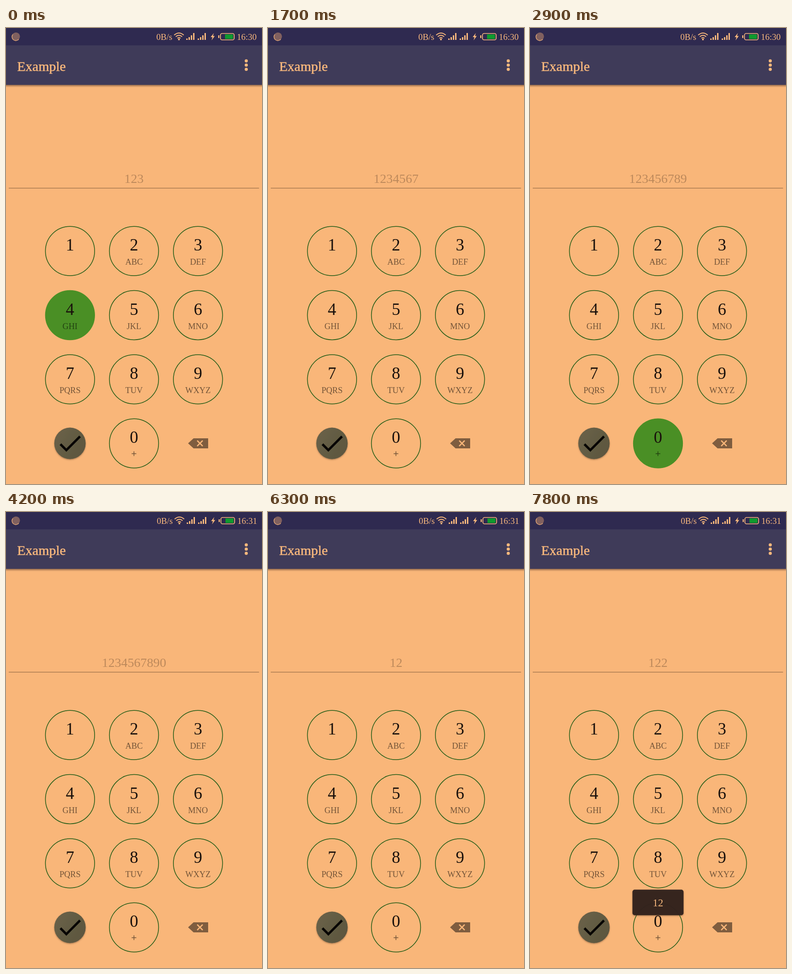
An HTML page for the animation above (8000 ms loop, 561 by 998 pixels).

```html
<!DOCTYPE html>
<html lang="en">
<head>
<meta charset="utf-8">
<title>Keypad</title>
<style>
  html, body { margin: 0; width: 100%; height: 100%; overflow: hidden; background: #f9b679; }
  svg { display: block; width: 561px; height: 998px; font-family: "Liberation Serif", "Times New Roman", serif; }
  .mid { text-anchor: middle; }
  .digit { font-size: 37px; fill: #1a110c; }
  .label { font-size: 18.5px; fill: #000; fill-opacity: .54; }
  .plus { font-size: 21px; stroke: #000; stroke-opacity: .3; stroke-width: .5px; }
  .ring { fill: none; stroke: #1d5a14; stroke-width: 1.5px; }
  .ring.down { fill: #4a8f25; stroke: #4a8f25; }
  .status { font-size: 19px; }
</style>
</head>
<body>
<svg viewBox="0 0 561 998">
  <defs>
    <linearGradient id="shade" x2="0" y2="1">
      <stop offset="0" stop-color="#5a3a28" stop-opacity=".6"/>
      <stop offset="1" stop-color="#5a3a28" stop-opacity="0"/>
    </linearGradient>
    <linearGradient id="olive" x2="1" y2=".6">
      <stop offset="0" stop-color="#6b6249"/>
      <stop offset="1" stop-color="#5d573f"/>
    </linearGradient>
    <filter id="soft" x="-20%" y="-20%" width="140%" height="150%">
      <feDropShadow dx="0" dy="1.5" stdDeviation="1.5" flood-color="#5a3a28" flood-opacity=".5"/>
    </filter>
  </defs>

  <rect width="561" height="998" fill="#f9b679"/>
  <rect y="124" width="561" height="6" fill="url(#shade)"/>
  <rect y="37" width="561" height="87.5" fill="#3f3b59"/>
  <rect width="561" height="38" fill="#2f2a50"/>

  <circle cx="21.8" cy="18.5" r="8.8" fill="#80605f"/>
  <path d="M15 14A8.3 8.3 0 0 0 28 24.5" fill="none" stroke="#dda274" stroke-width="1.6"/>

  <g id="status" class="status" fill="#fab97d">
    <text x="329.5" y="26">0B/s</text>
    <g fill="none" stroke="#fab97d" stroke-width="2">
      <path d="M368.5 15.5Q379 6.5 389.5 15.5M372 19Q379 13 386 19M375.5 22.5Q379 19.5 382.5 22.5"/>
      <rect x="470" y="12" width="30" height="14" rx="3.5" stroke-width="1.7"/>
    </g>
    <circle cx="379" cy="25" r="2"/>
    <path id="bars" d="M395 23h3v3h-3zM400 20h3v6h-3zM405 16h3v10h-3zM410 11h3v15h-3z"/>
    <use href="#bars" x="25"/>
    <path d="M455.5 11L448.5 20H452.5L450.5 27L457.5 17.5H453.5z"/>
    <rect x="465" y="16" width="2.5" height="6"/>
    <rect x="480" y="14" width="17.5" height="10" fill="#0f9a2d"/>
    <text id="clock" x="506" y="26">16:30</text>
  </g>

  <text x="24.5" y="93.5" font-size="30" fill="#fab97d" stroke="#fab97d" stroke-width=".5">Example</text>
  <g fill="#fab97d">
    <circle cx="526.5" cy="72" r="3.4"/>
    <circle cx="526.5" cy="81.2" r="3.4"/>
    <circle cx="526.5" cy="90.4" r="3.4"/>
  </g>

  <text id="entry" class="mid" x="280.5" y="339" font-size="28.2" fill="#bd895b"></text>
  <path d="M6 350.5H554.5" stroke="#a6784f" stroke-width="1.4"/>

  <g id="keys"></g>

  <circle cx="140.2" cy="909" r="34.4" fill="url(#olive)" filter="url(#soft)"/>
  <path transform="translate(108.4 877.2) scale(2.65)" d="M9 16.2L4.8 12L3.4 13.4L9 19L21 7L19.6 5.6z" fill="#080604"/>
  <path d="M399 909L411 898H443V920H411z" fill="#7f5d3f"/>
  <path d="M419 903L431 915M431 903L419 915" stroke="#f9b679" stroke-width="2.6"/>

  <g id="toast" filter="url(#soft)">
    <rect x="224.5" y="826.5" width="112" height="56" rx="5" fill="#30231c" fill-opacity=".96"/>
    <text class="mid" x="280.5" y="862.5" font-size="23" fill="#f5b67c">12</text>
  </g>
</svg>
<script>
const LOOP = 8000, STEP = 100;
const $ = id => document.getElementById(id);
const svgNode = (tag, attrs, text = "") => {
  const node = document.createElementNS("http://www.w3.org/2000/svg", tag);
  for (const name in attrs) node.setAttribute(name, attrs[name]);
  node.textContent = text;
  return $("keys").appendChild(node);
};

// Keypad: digits 1-9 in rows, 0 in the middle of the last row
const labels = ["+", "", "ABC", "DEF", "GHI", "JKL", "MNO", "PQRS", "TUV", "WXYZ"];
const rings = labels.map((label, n) => {
  const slot = n ? n - 1 : 10;
  const x = 140.3 + slot % 3 * 140.2;
  const y = 488.2 + Math.floor(slot / 3) * 140.3;
  const ring = svgNode("circle", { class: "ring", cx: x, cy: y, r: 53.9 });
  svgNode("text", { class: "mid digit", x, y: y - 1 }, n);
  svgNode("text", { class: n ? "mid label" : "mid label plus", x, y: y + 30 }, label);
  return ring;
});

// [digit, press time, release time]; the digit is entered on release
const taps = [[4, 0, 100], [5, 300, 500], [6, 1100, 1300], [7, 1600, 1700], [8, 2100, 2200],
  [9, 2600, 2700], [0, 2900, 3000], [2, 7700, 7800]];
const erases = [4600, 4900, 5100, 5300, 5500, 5700, 5900, 6200];
const edits = [...taps.map(([digit, , at]) => ({ at, digit })), ...erases.map(at => ({ at }))]
  .sort((a, b) => a.at - b.at);

function draw(t) {
  let entry = "123";
  for (const { at, digit } of edits) {
    if (at <= t) entry = digit === undefined ? entry.slice(0, -1) : entry + digit;
  }
  $("entry").textContent = entry;

  rings.forEach((ring, n) => ring.classList.toggle("down",
    taps.some(([digit, from, to]) => digit === n && t >= from && t < to)));

  const late = t >= 3300;
  $("clock").textContent = late ? "16:31" : "16:30";
  $("status").setAttribute("transform", `translate(${late ? 1 : 0})`);

  const fade = (Math.floor(t / STEP) * STEP - 7100) / 300;
  $("toast").setAttribute("opacity", Math.max(0, Math.min(1, fade)));
}

const start = performance.now();
function tick() {
  draw((performance.now() - start) % LOOP);
  requestAnimationFrame(tick);
}
tick();
</script>
</body>
</html>
```
